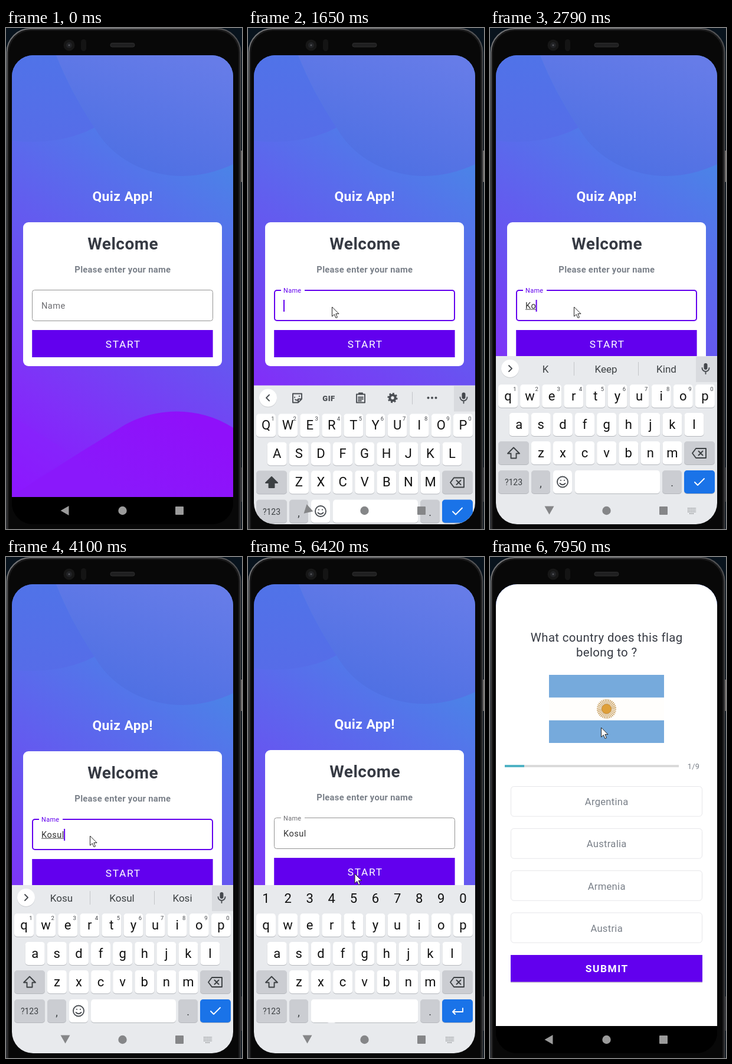
Recreate the animation shown at these times as an HTML page. Size 400 by 846 pixels, loop 8 s.

```html
<!DOCTYPE html>
<html lang="en">
<head>
<meta charset="utf-8">
<title>Quiz app</title>
<style>
html, body { margin: 0; width: 100%; height: 100%; overflow: hidden; background: #08131d; }
svg { display: block; width: 400px; height: 846px; font-family: Roboto, "Noto Sans", sans-serif; }
.mid { text-anchor: middle; }
.b { font-weight: 700; }
.cta { font-size: 17.3px; letter-spacing: 1.55px; fill: #fff; }
.field { font-size: 14.6px; letter-spacing: .456px; }
.ask { font-size: 20.4px; letter-spacing: .36px; fill: #363a43; }
.opt { font-size: 16.6px; letter-spacing: .29px; fill: #7a8089; }
.key { font-size: 22px; fill: #111; }
.icon { fill: none; stroke: #4a4e53; stroke-width: 1.9; stroke-linejoin: round; stroke-linecap: round; }
</style>
</head>
<body>
<svg viewBox="0 0 400 846">
  <defs>
    <linearGradient id="base" gradientUnits="userSpaceOnUse" x1="10" y1="792" x2="385" y2="200">
      <stop offset="0" stop-color="#8e10ff"/><stop offset=".25" stop-color="#8030f8"/>
      <stop offset=".55" stop-color="#6656f0"/><stop offset="1" stop-color="#4888e6"/>
    </linearGradient>
    <linearGradient id="bubble" gradientUnits="userSpaceOnUse" x1="320" y1="46" x2="250" y2="250">
      <stop offset="0" stop-color="#667ce8"/><stop offset="1" stop-color="#4f70e3"/>
    </linearGradient>
    <linearGradient id="bubble2" gradientUnits="userSpaceOnUse" x1="60" y1="46" x2="40" y2="192">
      <stop offset="0" stop-color="#5073e8"/><stop offset="1" stop-color="#566ce8"/>
    </linearGradient>
    <linearGradient id="hill" gradientUnits="userSpaceOnUse" x1="300" y1="650" x2="200" y2="792">
      <stop offset="0" stop-color="#8f10fa"/><stop offset="1" stop-color="#8a18fb"/>
    </linearGradient>
    <linearGradient id="rim" gradientUnits="userSpaceOnUse" x1="0" y1="0" x2="200" y2="400">
      <stop offset="0" stop-color="#77787a"/><stop offset=".5" stop-color="#4a4a4c"/>
      <stop offset="1" stop-color="#3c3c3e"/>
    </linearGradient>
    <clipPath id="screen"><rect x="10" y="46" width="375" height="792" rx="36"/></clipPath>
  </defs>

  <rect width="400" height="846" fill="#08131d"/>
  <rect x="1.5" y="1" width="396" height="890" rx="40" fill="#1b1b1c" stroke="url(#rim)" stroke-width="2"/>
  <rect x="5" y="4.5" width="389" height="880" rx="37" fill="#080808"/>
  <rect x="398.5" y="207" width="1.5" height="53" fill="#85807c"/>
  <rect x="398.5" y="742" width="1.5" height="58" fill="#3a3c40"/>
  <circle cx="107" cy="29" r="9.5" fill="#171717"/><circle cx="107" cy="29" r="5" fill="#222326"/>
  <circle cx="107" cy="29" r="1.5" fill="#55555a"/>
  <rect x="127" y="19" width="9" height="20" rx="4.5" fill="#141414"/>
  <rect x="177" y="25.5" width="41" height="6.5" rx="3" fill="#1f1f20" stroke="#2e2e2f"/>

  <g clip-path="url(#screen)">
    <rect x="10" y="46" width="375" height="792"/>
    <g id="home">
      <rect x="10" y="46" width="375" height="750" fill="url(#base)"/>
      <path d="M10 46H85C105 95 125 130 150 168C110 190 55 196 10 190Z" fill="url(#bubble2)"/>
      <path d="M85 46C105 95 125 130 150 168C180 222 240 250 300 250Q345 249 385 230V46Z" fill="url(#bubble)"/>
      <path d="M10 655L112 720L10 792Z" fill="#8a22fb" opacity=".35"/>
      <path d="M10 792C70 750 140 708 195 674C250 640 325 637 385 675V796H10Z" fill="url(#hill)"/>
      <text class="mid b" x="197.7" y="292" font-size="22.9" letter-spacing=".41" fill="#fff">Quiz App!</text>
      <rect x="29" y="328" width="337" height="243" rx="9" fill="#fff"/>
      <text class="mid b" x="198.2" y="374" font-size="28" letter-spacing=".5" fill="#363a43">Welcome</text>
      <text class="mid b" x="197.8" y="413" font-size="14.8" letter-spacing=".26" fill="#7a8089">Please enter your name</text>
      <rect id="outline" rx="4" fill="none"/>
      <rect id="gap" x="56" y="440" width="40" height="5" fill="#fff"/>
      <text id="label" class="field">Name</text>
      <text id="name" class="field" x="60" y="473.5" fill="#333"></text>
      <rect id="under" x="60" y="474.7" height="1" fill="#444"/>
      <rect id="caret" y="459" width="2" height="20" fill="#6200ee"/>
      <rect x="44.2" y="510" width="306.4" height="46" fill="#6200ee"/>
      <rect id="ripple" x="44.2" y="510" width="306.4" height="46" fill="#fff"/>
      <text class="mid cta" x="198.7" y="539.7" style="letter-spacing:1.7px">START</text>
    </g>
    <rect x="10" y="792" width="375" height="46"/>
    <g id="keyboard"></g>
    <rect id="scrim" x="10" y="46" width="375" height="792"/>
    <g id="quiz">
      <rect x="10" y="46" width="375" height="746" fill="#fff"/>
      <rect x="10" y="792" width="375" height="46"/>
      <text class="mid ask" x="197.7" y="143">What country does this flag</text>
      <text class="mid ask" x="197.7" y="168">belong to ?</text>
      <rect x="100" y="199" width="195" height="115" fill="#76aadc"/>
      <rect x="100" y="237.3" width="195" height="38.5" fill="#fffefc"/>
      <circle cx="197.5" cy="256.5" r="11.5" fill="none" stroke="#c59a56" stroke-width="10" pathLength="64" stroke-dasharray="1 1"/>
      <circle cx="197.5" cy="256.5" r="8" fill="#dfa03a" stroke="#b98232" stroke-width=".8"/>
      <rect x="25" y="351" width="295" height="4" fill="#dadada"/>
      <rect x="25" y="351" width="33" height="4" fill="#4fb2c4"/>
      <text class="mid" x="345" y="358" font-size="12.8" letter-spacing=".23" fill="#7a8089">1/9</text>
      <g id="options"></g>
      <rect x="35" y="673" width="325" height="46" fill="#000" opacity=".18"/>
      <rect x="35" y="672" width="325" height="45.5" fill="#6200ee"/>
      <text class="mid cta b" x="198.3" y="701">SUBMIT</text>
    </g>
    <g id="nav">
      <path id="back" d="M-8 0L6 -8V8Z"/>
      <circle cx="197.5" cy="815" r="7.2"/>
      <rect x="287" y="808" width="14" height="14" rx="1"/>
    </g>
  </g>
  <path id="cursor" d="M0 0V16L3.8 12.6L6.5 18.6L9 17.5L6.4 11.6H11.5Z" fill="#fff" stroke="#222"/>
  <circle id="tap" r="15" fill="#ff0" opacity=".5"/>
</svg>

<script>
const $ = id => document.getElementById(id);
const set = (id, attrs) => {
  for (const k in attrs) $(id).setAttribute(k, attrs[k]);
};
const show = (id, on) => set(id, { visibility: on ? 'visible' : 'hidden' });
const fill = (id, s) => { if ($(id).textContent !== s) $(id).textContent = s; };

const LOOP = 8000, PITCH = 37.1, PURPLE = '#6200ee', DIM = '#cbcdd2', INK = '#3c4043';
const ROWS = [['qwertyuiop', 14, 602], ['asdfghjkl', 32.7, 650], ['zxcvbnm', 69.9, 698]];

// --- build the quiz options and the keyboard ---
$('options').innerHTML = ['Argentina', 'Australia', 'Armenia', 'Austria'].map((s, i) => {
  const y = 387.5 + 71.1 * i;
  return `<rect x="35.5" y="${y}" width="324" height="50.5" rx="5" fill="#fff" stroke="#e6e6e9"/>
    <text class="mid opt" x="197.7" y="${y + 31.8}">${s}</text>`;
}).join('');

const box = (x, y, w, color, id = '') =>
  `<rect ${id && `id="${id}"`} x="${x}" y="${y}" width="${w}" height="39" rx="5" fill="${color}"/>`;
const key = (x, y, w, color = '#fff') => box(x, y + 1, w, '#b5b8bd') + box(x, y, w, color);
const label = (x, y, s, size, color = INK, more = '') =>
  `<text class="mid" x="${x}" y="${y}" font-size="${size}" fill="${color}" ${more}>${s}</text>`;
const icon = (d, more = '') => `<path class="icon" d="${d}" ${more}/>`;

let keys = '', hints = '', digits = '';
ROWS.forEach(([row, x0, y], r) => [...row].forEach((c, i) => {
  const x = x0 + PITCH * i;
  keys += key(x, y, 33) + `<text class="mid key letter" x="${x + 16.5}" y="${y + 26.6}">${c}</text>`;
  if (r) return;
  const n = (i + 1) % 10;
  hints += label(x + 28, y + 11, n, 9.5, '#44474c');
  digits += label(x + 16.5, 584, n, 22, '#111');
}));

$('keyboard').innerHTML = `
  <rect x="10" y="554" width="375" height="320" fill="#e8eaed"/>
  <g id="top">
    <rect x="349" y="555" width="36" height="43" fill="#d9dbdf"/>
    <rect x="362.5" y="566" width="6" height="11" rx="3" fill="#44474c"/>
    ${icon('M359.5 574a6 6 0 0 0 12 0M365.5 580v4')}
    <circle cx="34" cy="576" r="15" fill="#c8cace"/><circle cx="34" cy="575" r="15" fill="#fff"/>
  </g>
  <g id="tools">
    ${icon('M36 570l-5 5l5 5')}
    ${icon('M76 568h15v9l-6 6h-9zM91 577h-6v6M79 574v.5M87 572v.5M80 578q3 2 5 0')}
    ${label(137, 580, 'GIF', 13, '#4a4e53', 'font-weight="900" letter-spacing=".5"')}
    ${icon('M184 569h14v14h-14zM188 569v-2h6v2M187 574h8M187 577h8M187 580h5')}
    <circle class="icon" cx="245" cy="575" r="4.7" style="stroke-width:4"/>
    <circle class="icon" cx="245" cy="575" r="7.4" pathLength="16" stroke-dasharray="1 1" style="stroke-width:2.4;stroke-linecap:butt"/>
    <path d="M278.5 565v21" stroke="#c3c5c9"/>
    <g fill="#4a4e53"><circle cx="305.5" cy="575" r="2"/><circle cx="312" cy="575" r="2"/><circle cx="318.5" cy="575" r="2"/></g>
  </g>
  <g id="words">
    ${icon('M32 570l5 5l-5 5')}
    <path d="M142.5 564v23M251.5 564v23" stroke="#c3c5c9"/>
    ${[94, 196.5, 299].map((x, i) => label(x, 582, '', 17, INK, `id="word${i}"`)).join('')}
  </g>
  <g id="digits">${digits}</g>
  ${keys}<g id="hints">${hints}</g>
  ${key(14, 698, 52, DIM)}${key(329, 698, 52, DIM)}
  <path id="shift" class="icon" d="M40 708.5l10 10h-5.5v8h-9v-8H30z"/>
  ${icon('M343 718l6-8h17v16h-17zM353.5 714.5l7 7M360.5 714.5l-7 7', `style="stroke:${INK}"`)}
  ${key(14, 747, 52, DIM)}${label(40, 772, '?123', 14)}
  ${key(70, 747, 32, DIM)}${label(86, 775, ',', 18)}
  ${key(292, 747, 33, DIM)}${label(308.5, 774, '.', 18)}
  ${key(144, 747, 144)}${key(107, 747, 32)}${box(107, 747, 181, '#fff', 'wide')}
  <g id="smile"><circle class="icon" cx="123" cy="766.5" r="9"/>
    ${icon('M120 763.7v.4M126 763.7v.4M118.5 769q4.5 4.5 9 0')}</g>
  ${key(329, 747, 52, '#1a73e8')}
  <path id="enter" class="icon" style="stroke:#fff"/>
  <path d="M335 811h14M335 814h14M335 817h14M338 820h8" stroke="#8b8d90" stroke-width="1.6" stroke-dasharray="1.6 1"/>`;

const letters = [...document.querySelectorAll('.letter')];

// --- timeline ---
const rise = [[1440, 284], [1510, 200], [1580, 110], [1650, 50], [1720, 18], [1790, 5], [1920, 0],
  [6640, 0], [6690, 5], [6740, 60], [6820, 284]];
const turn = [[1440, 0], [1790, -70], [1920, -90], [6620, -90], [6690, -71], [6900, 0]];
const zoom = [[6550, .85], [6620, .93], [6690, .979], [6760, .99], [6900, .998], [7000, 1]];
const path = [[260, 331, 816], [380, 262, 728], [500, 207, 648], [650, 161, 558], [800, 150, 513],
  [970, 144, 482], [1100, 142.5, 471], [5650, 142.5, 471], [5850, 160, 500], [6080, 181, 535],
  [6700, 181, 535], [7040, 193, 551], [7180, 212, 535], [7350, 222, 484], [7530, 219.5, 420],
  [7670, 210, 376], [7810, 197, 326], [7950, 188.5, 288]];
const typed = [[0, ''], [2390, 'K'], [2790, 'Ko'], [3470, 'Kos'], [3680, 'Kosu'], [4100, 'Kosul']];
const offers = [[0, 'K Keep Kind'], [3000, 'Ko Kos Kosi'], [3680, 'Kos Kosul Kosi'],
  [3900, 'Kosu Kosul Kosi'], [4330, 'Kosul Kosu Kosun']];

function tween(t, steps, n = 1) {
  const i = steps.findIndex(s => s[0] > t);
  if (i === 0) return steps[0][n];
  if (i < 0) return steps[steps.length - 1][n];
  const a = steps[i - 1], b = steps[i];
  return a[n] + (b[n] - a[n]) * (t - a[0]) / (b[0] - a[0]);
}
const latest = (t, steps) => steps.filter(s => s[0] <= t).pop()[1];
const within = (t, a, b) => t >= a && t < b;

function drawField(t) {
  const focus = within(t, 1370, 5050);
  const up = tween(t, [[1370, 0], [1510, 1]]);
  const line = focus ? 2 : 1;
  set('outline', {
    x: 44 + line / 2, y: 442 + line / 2, width: 307 - line, height: 53 - line,
    stroke: focus ? PURPLE : '#949494', 'stroke-width': line
  });
  show('gap', up > .4);
  set('label', {
    transform: `translate(60 ${473.5 - 26.5 * up}) scale(${1 - .25 * up})`,
    fill: focus ? PURPLE : '#6c6c70'
  });
  fill('name', latest(t, typed));
  const w = $('name').getComputedTextLength();
  set('under', { width: focus ? w : 0 });
  set('caret', { x: 60 + w - (w ? .6 : 0) });
  show('caret', within(t, 1510, 1920) || within(t, 2390, 4840));
  set('ripple', { opacity: tween(t, [[6200, 0], [6290, .16], [6410, 0]]) });
  set('home', { transform: `translate(0 ${tween(t, [[4980, 0], [5250, -2]])})` });
}

function drawKeyboard(t) {
  const caps = t < 2460, plain = t >= 5120;
  set('keyboard', { transform: `translate(0 ${tween(t, rise)})` });
  letters.forEach(e => {
    const c = caps ? e.textContent.toUpperCase() : e.textContent.toLowerCase();
    if (c !== e.textContent) e.textContent = c;
  });
  set('shift', { style: `stroke:${INK};fill:${caps ? INK : 'none'}` });
  show('top', !plain);
  show('tools', t < 2520);
  show('words', t >= 2520 && !plain);
  show('digits', plain);
  show('hints', !plain);
  show('smile', !plain);
  show('wide', plain);
  latest(t, offers).split(' ').forEach((s, i) => fill('word' + i, s));
  set('enter', { d: plain ? 'M364 762v6h-17M351 764l-4 4l4 4' : 'M347 767l5 5l11 -11' });
}

function draw(t) {
  drawField(t);
  drawKeyboard(t);
  const light = within(t, 1580, 6620), s = tween(t, zoom), angle = tween(t, turn);
  set('scrim', { opacity: tween(t, [[6600, 0], [6680, .2]]) });
  set('quiz', {
    opacity: tween(t, [[6610, 0], [6660, 1]]),
    transform: `translate(197.5 442) scale(${s}) translate(-197.5 -442)`
  });
  set('nav', { fill: light ? '#858688' : '#9b9b9b' });
  set('back', { transform: `translate(100.5 ${815 + angle / 60}) rotate(${angle})` });

  const x = tween(t, path, 1), y = tween(t, path, 2);
  show('cursor', t >= 260);
  set('cursor', { transform: `translate(${x} ${y})` });
  show('tap', within(t, 1170, 1370) || within(t, 6220, 6400));
  set('tap', { cx: x - .5, cy: y - 1 });
}

const start = performance.now();
function tick() {
  draw((performance.now() - start) % LOOP);
  requestAnimationFrame(tick);
}
tick();
</script>
</body>
</html>
```
